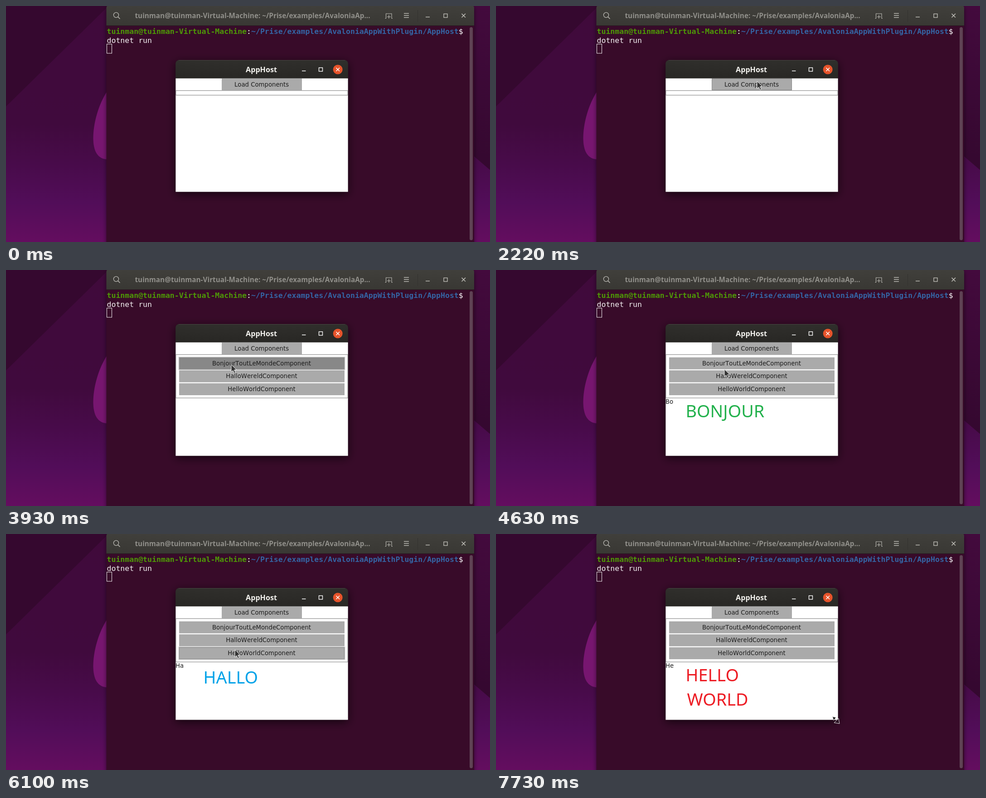
Animation, 1068 px wide and 524 px high, one loop 8 s. Source, as an HTML page with a canvas:

```html
<!DOCTYPE html>
<html lang="en">
<head>
<meta charset="utf-8">
<title>AppHost demo</title>
<style>
html, body { margin: 0; width: 100%; height: 100%; overflow: hidden; background: #380b29; }
canvas { display: block; width: 1068px; height: 524px; }
</style>
</head>
<body>
<canvas id="stage" width="1068" height="524"></canvas>
<script>
const ctx = document.getElementById('stage').getContext('2d');
const LOOP = 8000;
const TICK = 78;
const MONO = '16.54px "DejaVu Sans Mono", monospace';
const UI = '13.25px "DejaVu Sans", sans-serif';
const SANS = '"Noto Sans", "Open Sans", sans-serif';
const BIG = '500 37.8px ' + SANS;
const USER = 'tuinman';
const HOST = USER + '@' + USER + '-Virtual-Machine';

// "linger" is how long the hover border stays after a click
const loadButton = { label: 'Load Components', x: 476, y: 161, w: 177, h: 26,
  press: 2600, release: 2830, linger: 0 };
const items = [
  { label: 'BonjourToutLeMondeComponent', press: 3930, release: 4250, linger: 0,
    lines: ['BONJOUR'], color: '#22b14c', left: 421.5, base: 327 },
  { label: 'HalloWereldComponent', press: 5030, release: 5260, linger: 70,
    lines: ['HALLO'], color: '#00a2e8', left: 438.5, base: 331.5 },
  { label: 'HelloWorldComponent', press: 6410, release: 6640, linger: 80,
    lines: ['HELLO', 'WORLD'], color: '#ed1c24', left: 421.5, base: 327 }
].map((b, i) => ({ ...b, x: 382, y: 194 + i * 28.75, w: 365, h: 26.5, halo: true }));

// Pointer moves: time of the first step and of the last, end point
const moves = [
  [1360, 1360, 650, 317],
  [1820, 2220, 576, 167],
  [3230, 3300, 502, 206],
  [3470, 3620, 497, 212],
  [3800, 3800, 497, 210],
  [4480, 4720, 511, 231],
  [5790, 6180, 503, 266],
  [6870, 7020, 778, 353],
  [7340, 7730, 750, 413]
];

const ease = p => p * p * (3 - 2 * p);

function pointerAt(t) {
  let pos = null;
  for (const [start, end, x, y] of moves) {
    if (t < start) break;
    const gaps = Math.round((end - start) / TICK);
    const gap = gaps ? (end - start) / gaps : 1;
    const step = Math.min(gaps, Math.floor((t - start) / gap + 1e-6)) + 1;
    const p = ease(step / (gaps + 1));
    pos = pos
      ? { x: pos.x + (x - pos.x) * p, y: pos.y + (y - pos.y) * p }
      : { x, y };
  }
  return pos;
}

function rect(x, y, w, h, color) {
  ctx.fillStyle = color;
  ctx.fillRect(x, y, w, h);
}

function frame(x, y, w, h, color, width = 1) {
  ctx.strokeStyle = color;
  ctx.lineWidth = width;
  ctx.strokeRect(x, y, w, h);
}

function rounded(x, y, w, h, radii, color) {
  ctx.fillStyle = color;
  ctx.beginPath();
  ctx.roundRect(x, y, w, h, radii);
  ctx.fill();
}

function poly(points, color) {
  ctx.beginPath();
  points.forEach(([x, y]) => ctx.lineTo(x, y));
  ctx.closePath();
  ctx.fillStyle = color;
  ctx.fill();
}

function line(color, width, ...points) {
  ctx.strokeStyle = color;
  ctx.lineWidth = width;
  ctx.beginPath();
  points.forEach(([x, y]) => ctx.lineTo(x, y));
  ctx.stroke();
}

function cross(x, y, r, color) {
  line(color, 1.5, [x - r, y - r], [x + r, y + r]);
  line(color, 1.5, [x + r, y - r], [x - r, y + r]);
}

function text(s, x, y, font, color, align = 'left') {
  ctx.font = font;
  ctx.fontKerning = font === UI ? 'none' : 'auto';
  ctx.fillStyle = color;
  ctx.textAlign = align;
  ctx.fillText(s, x, y);
}

// Text whose visible ink starts at the given x
function inkText(s, x, y, font, color) {
  ctx.font = font;
  ctx.textAlign = 'left';
  text(s, x + ctx.measureText(s).actualBoundingBoxLeft, y, font, color);
}

function gradient(y1, y2, ...colors) {
  const g = ctx.createLinearGradient(0, y1, 0, y2);
  colors.forEach((c, i) => g.addColorStop(i / (colors.length - 1), c));
  return g;
}

function withShadow(blur, dy, alpha, draw) {
  ctx.save();
  ctx.shadowColor = `rgba(0,0,0,${alpha})`;
  ctx.shadowBlur = blur;
  ctx.shadowOffsetY = dy;
  draw();
  ctx.restore();
}

function drawDesktop() {
  rect(0, 0, 1068, 524, gradient(0, 524,
    '#400a3b', '#400a3c', '#400a3c', '#400a3d', '#480b4a', '#520d59', '#640d5f'));
  poly([[0, 0], [226, 0], [0, 223]], '#35082f');
  poly([[1033, 0], [1068, 0], [1068, 364], [1033, 334]], gradient(0, 364, '#430a3d', '#34082f'));
  ctx.beginPath();
  ctx.moveTo(224, 188);
  ctx.bezierCurveTo(203, 220, 192.5, 262, 192.5, 293);
  ctx.bezierCurveTo(192.5, 322, 202, 340, 224, 340.5);
  ctx.fillStyle = '#771670';
  ctx.fill();
}

function drawTerminal() {
  withShadow(10, 2, 0.5, () => rounded(221.5, 0, 811.5, 540, [6, 6, 0, 0], '#380b29'));
  rounded(221.5, -2, 811.5, 45, [6, 6, 0, 0], gradient(0, 43, '#403f3b', '#393834'));
  rect(221.5, 43, 811.5, 1, '#25211f');
  rounded(1023, 47, 7, 473, 3.5, '#5f4254');

  text(HOST + ': ~/Prise/examples/AvaloniaAp...', 544, 27, 'bold 15.3px ' + SANS, '#908f8a', 'center');

  const icon = '#bdbcb6';
  ctx.strokeStyle = icon;
  ctx.lineWidth = 1.3;
  ctx.beginPath();
  ctx.arc(243, 20, 5.6, 0, Math.PI * 2);
  ctx.stroke();
  line(icon, 1.5, [247, 24], [251.5, 28.5]);
  line(icon, 1.1, [836.5, 27.5], [838.5, 27.5], [838.5, 17], [851, 17], [851, 27.5], [853, 27.5]);
  line(icon, 1.1, [844.8, 20], [844.8, 28]);
  line(icon, 1.1, [840.8, 24], [848.8, 24]);
  for (let y = 16.5; y < 27; y += 4.5) line(icon, 1.5, [878, y], [889, y]);
  line('#33322f', 1, [908.5, 9], [908.5, 35]);
  line(icon, 1.5, [926, 24.5], [935, 24.5]);
  frame(966, 17.5, 8, 8, icon, 1.4);
  cross(1009.7, 21.3, 4.2, icon);

  let x = 222.5;
  const prompt = [
    [HOST, 'bold ', '#4e9a06'],
    [':', '', '#ffffff'],
    ['~/Prise/examples/AvaloniaAppWithPlugin/AppHost', 'bold ', '#3465a4'],
    ['$', '', '#ffffff']
  ];
  for (const [s, weight, color] of prompt) {
    text(s, x, 61.5, weight + MONO, color);
    x += ctx.measureText(s).width;
  }
  text('dotnet run', 222.5, 81.5, MONO, '#f2eff1');
  frame(222.5, 84.5, 11, 20.5, '#f2eff1');
}

function drawWindow() {
  withShadow(20, 5, 0.65, () => rounded(374.4, 120, 380.2, 292.6, [8, 8, 0, 0], '#2b2a28'));
  rounded(374.4, 120, 380.2, 41, [8, 8, 0, 0], gradient(120, 161, '#302f2c', '#282724'));
  line('#464541', 1, [381, 120.5], [748, 120.5]);
  rect(374.4, 160.7, 380.2, 251.9, '#ffffff');
  text('AppHost', 563.5, 146.5, 'bold 16.15px ' + SANS, '#f3f2ee', 'center');
  line('#ffffff', 1.5, [653, 144.2], [661.5, 144.2]);
  frame(690.5, 137, 8, 8, '#ffffff', 1.4);
  ctx.beginPath();
  ctx.arc(732.2, 141, 10.5, 0, Math.PI * 2);
  ctx.fillStyle = '#e6532b';
  ctx.fill();
  cross(732.2, 141, 3.8, '#ffffff');
}

function isOver(b, t, pos) {
  return pos && t < b.release + b.linger && pos.y > b.y - 1.5 && pos.y < b.y + b.h;
}

function drawButton(b, t, pos) {
  const over = isOver(b, t, pos);
  const pressed = t >= b.press && t < b.release;
  if (over && b.halo) rect(b.x - 1.5, b.y - 1.5, b.w + 3, b.h + 3, '#cdcdcd');
  rect(b.x, b.y, b.w, b.h, pressed ? '#888888' : '#aaaaaa');
  if (over) frame(b.x + 0.5, b.y + 0.5, b.w - 1, b.h - 1, '#888888');
  text(b.label, b.x + b.w / 2 - 0.5, b.y + 17.7, UI, '#1c1c1c', 'center');
}

function drawContent(t, pos) {
  const loaded = t >= loadButton.release;
  drawButton(loadButton, t, pos);
  frame(374.9, 187.8, 379.2, loaded ? 96.3 : 10.2, '#777777');
  if (loaded) items.forEach(b => drawButton(b, t, pos));

  const shown = items.filter(b => t >= b.release).pop();
  if (!shown) return;
  text(shown.label.slice(0, 2), 374, 297, UI, '#1c1c1c');
  shown.lines.forEach((s, i) =>
    inkText(s, shown.left, shown.base + i * 54, BIG, shown.color));
}

function shape(points, pos, fill, stroke) {
  poly(points.map(([x, y]) => [pos.x + x, pos.y + y]), fill);
  ctx.strokeStyle = stroke;
  ctx.lineWidth = 1;
  ctx.stroke();
}

function drawPointer(t, pos) {
  if (!pos) return;
  if (t >= LOOP - 350) {
    shape([[-7.5, -7.5], [0.5, -5.5], [-5, 0.5]], pos, '#111111', '#e8e8e8');
    shape([[6, -3.5], [8, 8], [-4, 6]], pos, '#2a1022', '#e8e8e8');
  } else {
    shape([[0, 0], [0, 16.5], [3.8, 13], [6.6, 19.3], [9.4, 18], [6.7, 11.9], [11.6, 11.6]],
      pos, '#333333', '#f4f4f4');
  }
}

function render(t) {
  const pos = pointerAt(t);
  drawDesktop();
  drawTerminal();
  drawWindow();
  drawContent(t, pos);
  drawPointer(t, pos);
}

const begin = performance.now();
function tick() {
  render((performance.now() - begin) % LOOP);
  requestAnimationFrame(tick);
}
tick();
</script>
</body>
</html>
```
